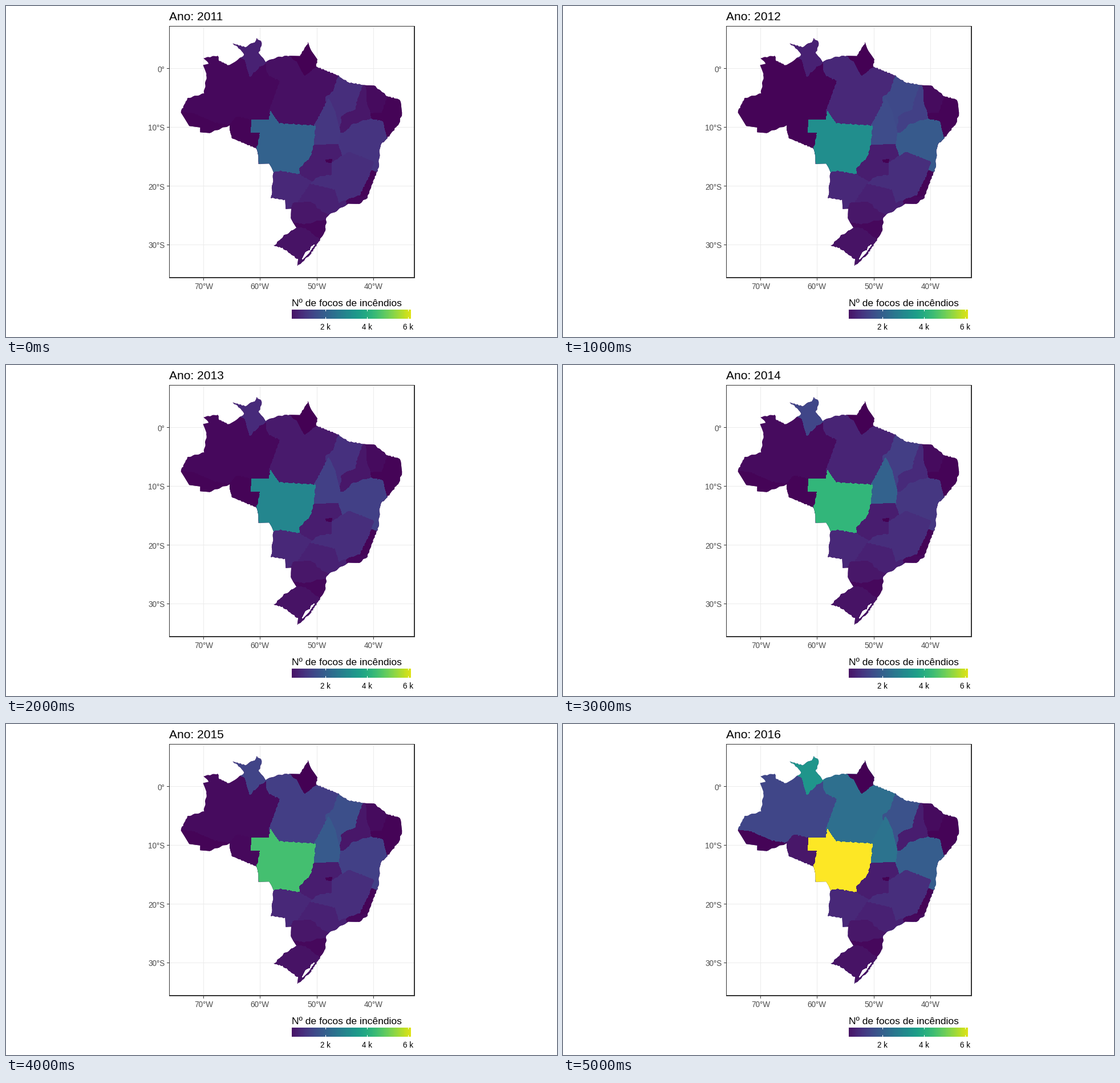
Animation of 966 by 580 pixels, one loop 6 s. Source, as a matplotlib script:

```python
import numpy as np
import matplotlib.pyplot as plt
from matplotlib.animation import FuncAnimation
from matplotlib.patches import Polygon, Rectangle
from matplotlib.path import Path

W, H, DPI = 966, 580, 64
DARK, GREY, PALE = "#333333", "#4d4d4d", "#ebebeb"
plt.rcParams["font.family"] = "Liberation Sans"
viridis = plt.get_cmap("viridis")

fig = plt.figure(figsize=(W / DPI, H / DPI), dpi=DPI, facecolor="white")
ax = fig.add_axes([0, 0, 1, 1])
ax.axis("off")


def rough(points, amp=0.8):
    """Split slanted edges and shift them by a fixed wave field,
    so that neighbours sharing an edge stay joined."""
    out = []
    for (x0, y0), (x1, y1) in zip(points, points[1:] + points[:1]):
        dx, dy = x1 - x0, y1 - y0
        n = 1 if min(abs(dx), abs(dy)) < 3 else int(np.hypot(dx, dy) // 3) + 1
        t = np.arange(n) / n
        x, y = x0 + dx * t, y0 + dy * t
        sx = amp * np.sin(1.9 * y + 0.8 * x)
        sy = amp * np.sin(1.6 * x - 0.9 * y)
        out.append(np.column_stack([x + sx, y + sy]))
    return np.vstack(out)


def box(x, y, w, h, color, z):
    ax.add_patch(Rectangle((x, y), w, h, fc=color, lw=0, aa=False, zorder=z))


def text(x, y, s, px, color="black", ha="left"):
    return ax.text(x, y, s, fontsize=px * 72 / DPI, color=color, ha=ha,
                   va="baseline", zorder=6)


# Panel, grid and axes
for k in range(4):
    x, y = int(346 + 99.5 * k), 109 + 103 * k
    box(x, 37, 1, 439, PALE, 1)
    box(287, y, 428, 1, PALE, 1)
    box(x, 477, 1, 4, DARK, 5)
    box(282, y, 4, 1, DARK, 5)
    text(x + 0.3, 496, f"{70 - 10 * k}°W", 13.5, GREY, "center")
    text(278.5, y + 6.5, f"{10 * k}°S" if k else "0°", 13.5, GREY, "right")
box(286, 35, 430, 1, DARK, 5)
box(286, 475, 430, 2, DARK, 5)
box(286, 35, 1, 442, DARK, 5)
box(715, 35, 2, 442, DARK, 5)

# Country outline, clockwise from the north-west corner
outline = rough([
    (347, 153), (352, 119), (345, 103), (355, 102), (347, 91), (371, 87),
    (374, 96), (391, 104), (411, 91), (417, 86), (412, 77), (398, 66),
    (419, 72), (437, 63), (440, 56), (449, 65), (443, 83), (456, 98),
    (475, 90), (497, 87), (515, 88), (530, 64), (536, 80), (546, 94),
    (543, 106), (580, 121), (600, 134), (624, 138), (645, 139), (668, 158),
    (690, 164), (695, 186), (689, 206), (668, 232), (656, 244), (653, 284),
    (645, 304), (633, 336), (620, 346), (599, 347), (562, 369), (559, 396),
    (548, 413), (533, 436), (511, 456), (512, 444), (485, 424), (470, 420),
    (488, 402), (509, 389), (500, 371), (500, 355), (491, 355), (489, 340),
    (465, 336), (469, 292), (461, 277), (443, 276), (440, 250), (395, 231),
    (392, 209), (358, 222), (340, 222), (340, 212), (322, 211), (306, 186),
    (318, 162),
])
clip = Path(np.vstack([outline, outline[:1]]))
changing = []


def state(level, *points):
    """Paint a state; level is its percent of the scale, fixed or per year."""
    patch = Polygon(rough(list(points)) if points else outline,
                    lw=0, aa=False, zorder=3)
    ax.add_patch(patch)
    patch.set_clip_path(clip, ax.transData)
    if isinstance(level, int):
        patch.set_facecolor(viridis(level / 100))
    else:
        changing.append((patch, level))


# Later states cover earlier ones; all are cut at the outline
state((2, 1, 2, 3, 3, 21))  # Amazonas fills the rest
state(1, (290, 184), (327, 188), (367, 205), (394, 209), (394, 235),  # Acre
      (290, 235))
state((1, 1, 1, 1, 2, 6),  # Rondônia
      (391, 209), (405, 194), (432, 200), (450, 220), (450, 260), (385, 250))
state((4, 11, 7, 10, 18, 36),  # Pará
      (456, 106), (460, 121), (481, 131), (462, 182), (464, 212), (600, 212),
      (600, 100), (540, 60), (457, 80))
state((9, 9, 12, 21, 20, 52),  # Roraima
      (385, 50), (460, 50), (458, 98), (444, 107), (428, 123), (419, 95),
      (400, 80))
state(0, (497, 86), (520, 50), (560, 60), (543, 106), (524, 122),  # Amapá
      (513, 101))
state(1, (630, 120), (720, 120), (720, 240), (660, 250), (620, 190))  # Coast
state(3, (630, 120), (690, 120), (668, 158), (658, 187), (639, 188),  # Ceará
      (620, 160))
state((6, 19, 6, 12, 6, 8),  # Piauí
      (628, 120), (633, 172), (641, 199), (600, 228), (575, 226), (590, 170))
state((13, 22, 14, 18, 24, 25),  # Maranhão
      (586, 100), (628, 130), (615, 165), (612, 180), (588, 192), (585, 215),
      (565, 200), (561, 160), (574, 150), (583, 121))
state((15, 28, 19, 16, 19, 29),  # Bahia
      (580, 225), (595, 221), (607, 208), (638, 198), (660, 202), (668, 230),
      (700, 240), (670, 305), (575, 290))
state((16, 23, 19, 31, 28, 38),  # Tocantins
      (565, 163), (578, 186), (585, 221), (583, 250), (530, 250), (540, 210),
      (554, 185))
state(8, (538, 243), (583, 243), (600, 310), (530, 312), (505, 295),  # Goiás
      (530, 265))
state(11, (455, 285), (515, 285), (513, 295), (536, 308), (514, 343),
      (500, 365), (440, 340))  # Mato Grosso do Sul
state(9, (534, 311), (620, 312), (610, 365), (566, 385), (510, 347))  # S. Paulo
state(6, (490, 372), (505, 344), (535, 343), (552, 360), (575, 370),  # Paraná
      (570, 395), (500, 395))
state(2, (495, 379), (525, 383), (548, 377), (575, 375), (560, 420),
      (500, 410))  # Santa Catarina
state(5, (500, 387), (525, 390), (550, 410), (550, 470), (440, 470),
      (440, 400))  # Rio Grande do Sul
state(2, (596, 341), (640, 320), (660, 360), (603, 360))  # Rio de Janeiro
state(1, (630, 285), (660, 294), (645, 327), (620, 335))  # Espírito Santo
state(13, (585, 266), (601, 256), (645, 273), (636, 298), (626, 318),
      (620, 331), (583, 344), (577, 321), (534, 311), (547, 300), (571, 296),
      (572, 274))  # Minas Gerais
state((31, 49, 46, 66, 70, 100),  # Mato Grosso
      (430, 200), (461, 200), (464, 185), (478, 206), (542, 210), (539, 243),
      (533, 264), (513, 285), (514, 294), (480, 288), (465, 292), (461, 277),
      (443, 277), (440, 250), (446, 222), (430, 222))
state(0, (561, 269), (571, 269), (571, 274), (561, 274))  # Distrito Federal

lagoon = [(541, 418), (535, 422), (533, 428), (526, 431), (519, 444),
          (529, 435)]
ax.add_patch(Polygon(lagoon, fc="white", lw=0, aa=False, zorder=4))

# Colour bar
text(501, 526, "Nº de focos de incêndios", 17.45)
ramp = np.linspace(0.05, 0.95, 209)[None, :]
ax.imshow(ramp, cmap=viridis, vmin=0, vmax=1, extent=(501, 710, 548, 532),
          aspect="auto", interpolation="nearest", zorder=2)
for k in (2, 4, 6):
    x = int(488 + 36.25 * k)
    box(x, 532, 1, 3, "white", 5)
    box(x, 545, 1, 3, "white", 5)
    text(x + 0.3, 567, f"{k} k", 13.5, ha="center")

title = text(286, 25, "", 21)
ax.set_xlim(0, W)
ax.set_ylim(H, 0)


def draw(i):
    title.set_text(f"Ano: {2011 + i}")
    for patch, levels in changing:
        patch.set_facecolor(viridis(levels[i] / 100))
    return [title] + [patch for patch, _ in changing]


anim = FuncAnimation(fig, draw, frames=6, interval=1000, repeat=True,
                     repeat_delay=0, blit=False)
plt.show()
```
